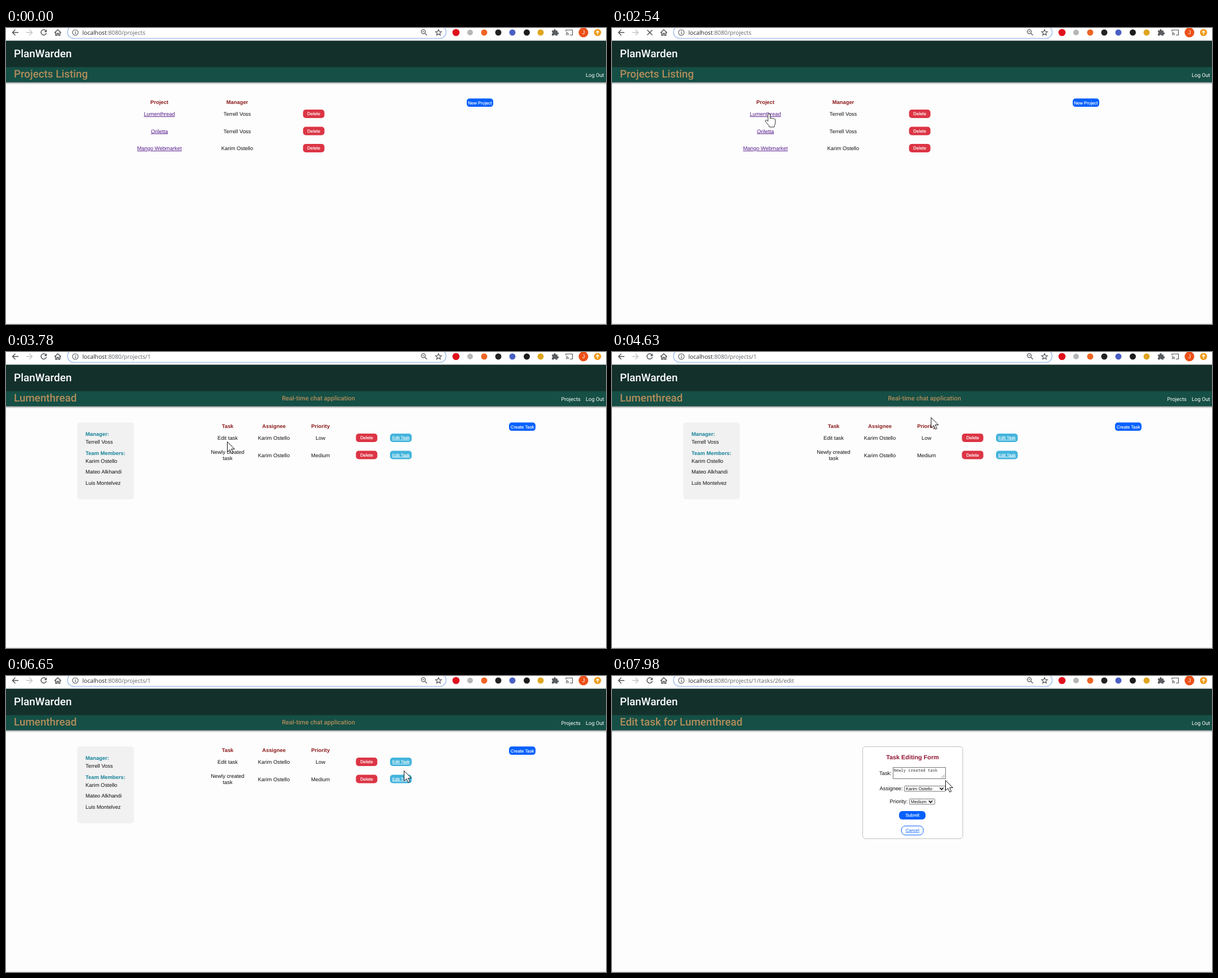
An HTML page that plays this animation: 1064x526 px, repeating every 8000 ms.

```html
<!DOCTYPE html>
<html lang="en">
<head>
<meta charset="utf-8">
<title>Projects Listing</title>
<style>
html, body { margin: 0; width: 100%; height: 100%; overflow: hidden; background: #fdfdfd; }
svg { display: block; width: 100%; height: 100%; }
text { font: 9.4px "Liberation Sans", Arial, sans-serif; fill: #111; text-rendering: geometricPrecision; }
.mid text, text.mid { text-anchor: middle; }
.b { font-weight: 700; }
text.th { font-weight: 700; fill: #8b1a1a; }
text.side { font-weight: 700; fill: #17829a; }
text.link { fill: #551a8b; text-decoration: underline; }
text.btn { font-size: 7.85px; fill: #fff; stroke: #fff; stroke-width: .15; text-anchor: middle; }
text.edit { font-size: 7.6px; text-decoration: underline; }
text.head { font: 500 19px Roboto, "Open Sans", sans-serif; fill: #fff; }
text.title { font: 500 18.8px Roboto, "Open Sans", sans-serif; fill: #b28d5b; }
text.sub { font: 500 11.1px Roboto, "Open Sans", sans-serif; fill: #b28d5b; }
text.nav { font: 9.4px Roboto, "Open Sans", sans-serif; fill: #fff; }
text.url { font: 10.3px "Open Sans", "Noto Sans", sans-serif; fill: #5f6368; }
text.field { font-size: 7.8px; }
.icon { fill: none; stroke: #505357; stroke-width: 1.5; }
.blue { fill: #0560fd; }
.red { fill: #dc3545; }
.cyan { fill: #43b4dc; }

/* one clock for every part; small lead keeps steps on time */
.a { animation: 8s step-end -5ms infinite; }
.list { animation-name: list; }
.proj { animation-name: proj; }
.form { animation-name: form; }
.idle { animation-name: idle; }
.busy { animation-name: busy; }
.id { animation-name: id; }
.task { animation-name: task; }
.cursor { animation-name: move; }
.arrow { animation-name: arrow; }
.hand { animation-name: hand; }

@keyframes list { 0% { opacity: 1 } 38.625%, 100% { opacity: 0 } }
@keyframes proj { 0% { opacity: 0 } 38.625% { opacity: 1 } 93.875%, 100% { opacity: 0 } }
@keyframes form { 0% { opacity: 0 } 93.875%, 100% { opacity: 1 } }
@keyframes idle { 0%, 41.625%, 95%, 100% { opacity: 1 } 31.75%, 88% { opacity: 0 } }
@keyframes busy { 0%, 41.625%, 95%, 100% { opacity: 0 } 31.75%, 88% { opacity: 1 } }
@keyframes id { 0% { fill-opacity: 0 } 36.75%, 100% { fill-opacity: 1 } }
@keyframes task { 0% { fill-opacity: 0 } 91%, 100% { fill-opacity: 1 } }

@keyframes arrow {
  0%, 18.75%, 41.625%, 82.5%, 96.875%, 100% { opacity: 1 }
  14%, 20.875%, 61.7%, 84.3% { opacity: 0 }
}
@keyframes hand {
  0%, 18.75%, 41.625%, 82.5%, 96.875%, 100% { opacity: 0 }
  14%, 20.875%, 61.7%, 84.3% { opacity: 1 }
}
@keyframes move {
  0% { transform: translate(1100px, 600px) }
  4.375% { transform: translate(976px, 506px); animation-timing-function: steps(3) }
  7.25% { transform: translate(690px, 352px); animation-timing-function: steps(3) }
  10.125% { transform: translate(355px, 192px); animation-timing-function: steps(4) }
  14% { transform: translate(255px, 147px) }
  15% { transform: translate(256px, 147px) }
  16.875% { transform: translate(259px, 148px) }
  17.875% { transform: translate(261px, 147px) }
  18.75% { transform: translate(262px, 135px) }
  20.875% { transform: translate(259px, 149px) }
  21.75% { transform: translate(256px, 149px) }
  23.875% { transform: translate(258px, 149px); animation-timing-function: steps(8) }
  31.75% { transform: translate(279px, 152px) }
  43.5% { transform: translate(290px, 156px); animation-timing-function: steps(4) }
  47.25% { transform: translate(392px, 159px); animation-timing-function: steps(6) }
  53.125% { transform: translate(477px, 141px) }
  54.125% { transform: translate(492px, 134px); animation-timing-function: steps(4) }
  58% { transform: translate(590px, 110px); animation-timing-function: steps(6) }
  63.625% { transform: translate(706px, 149px) }
  64.625% { transform: translate(705px, 150px) }
  65.5% { transform: translate(704px, 150px) }
  70.5% { transform: translate(704.5px, 152px) }
  80.25% { transform: translate(706px, 156px); animation-timing-function: steps(5) }
  85.5% { transform: translate(704.5px, 186px) }
  96.875% { transform: translate(688px, 196px) }
  97.875% { transform: translate(652px, 200px) }
  98.75% { transform: translate(612px, 194px) }
  99.75%, 100% { transform: translate(591px, 185px) }
}
</style>
</head>
<body>
<svg viewBox="0 0 1064 526">
  <defs>
    <linearGradient id="shade" x2="0" y2="1">
      <stop stop-color="#9a9a9a"/><stop offset="1" stop-color="#fdfdfd"/>
    </linearGradient>
    <g id="delete">
      <rect class="red" width="38" height="14.800" rx="5"/>
      <text class="btn" x="19" y="10.400">Delete</text>
    </g>
    <g id="edit">
      <rect class="cyan" width="38.500" height="14.800" rx="5"/>
      <text class="btn edit" x="19.400" y="10">Edit Task</text>
    </g>
    <path id="chevron" d="M-3.200-1.800 0 1.600 3.200-1.800" fill="none" stroke="#111" stroke-width="1.700"/>
  </defs>

  <rect width="1064" height="526" fill="#fdfdfd"/>
  <path d="M0 525.500H1064" stroke="#e4e4e4"/>

  <!-- browser bar -->
  <rect width="1064" height="23" fill="#fff"/>
  <rect x="109" y="-4" width="671.500" height="22.500" rx="11.200" fill="#fff" stroke="#a9c6ee" stroke-width="1.600"/>
  <path class="icon" d="M22 8H12M16.500 3 11.500 8l5 5"/>
  <path class="icon" d="M36 8H46M41.500 3l5 5-5 5" style="stroke:#c3c5c8"/>
  <g class="a idle">
    <path class="icon" d="M70.500 4.500A4.800 4.800 0 1 0 71.600 9"/>
    <path d="M72.300 2.500V7.300H67.500z" fill="#505357"/>
  </g>
  <path class="icon a busy" d="M62.500 3.500l9 9m0-9-9 9"/>
  <path class="icon" d="M86 8.500 91.800 3l5.800 5.500M88 7.500V13h2.500V9.500h2.600V13h2.500V7.500"/>
  <circle class="icon" cx="123" cy="8" r="5" style="stroke-width:1.1"/>
  <path class="icon" d="M123 7.300V11M123 5V6.300" style="stroke-width:1.2"/>
  <text class="url" x="135.500" y="12"><tspan fill="#202124">localhost</tspan>:8080/projects<tspan class="a id">/1</tspan><tspan class="a task">/tasks/26/edit</tspan></text>
  <g class="icon" style="stroke-width:1.2">
    <circle cx="740" cy="6.500" r="3.600"/><path d="M742.700 9.300 746.500 13M738.300 6.500h3.400"/>
    <path d="M767 2.800l1.500 3.500 3.800.3-2.900 2.500.9 3.700-3.300-2-3.300 2 .9-3.700-2.900-2.500 3.800-.3z"/>
    <path d="M993 6V3.500h11.500v9H1000M993 12.300h1M993 10a2.500 2.500 0 0 1 2.500 2.500M993 7.800a4.700 4.700 0 0 1 4.700 4.700"/>
  </g>
  <circle cx="798" cy="8" r="6.300" fill="#e0101c"/>
  <circle cx="823" cy="8" r="5" fill="#b4b6b8"/>
  <circle cx="848" cy="8" r="5.500" fill="#ee6423"/>
  <circle cx="873" cy="8" r="5.500" fill="#222"/>
  <circle cx="898" cy="8" r="5.500" fill="#4a5fc4"/>
  <circle cx="923.500" cy="8" r="5.500" fill="#1c1c1c"/>
  <circle cx="948" cy="8" r="5.500" fill="#dfa51f"/>
  <path d="M968 4.500h3.300a1.800 1.800 0 1 1 3.400 0H978v3.300a1.800 1.800 0 1 1 0 3.400v2.300h-3.300a1.800 1.800 0 0 0-3.400 0H968v-3.300a1.800 1.800 0 0 0 0-3.400z" fill="#5a5d61"/>
  <circle cx="1024" cy="8" r="8.600" fill="#ec5019"/>
  <text class="mid" x="1024" y="11.300" style="fill:#fff">J</text>
  <circle cx="1049" cy="8" r="6.300" fill="#f09a16"/>
  <path d="M1049 11.500V5.500M1046.300 7.800 1049 5l2.700 2.800" fill="none" stroke="#fff" stroke-width="1.500"/>

  <!-- site header -->
  <rect y="96" width="1064" height="4.500" fill="url(#shade)"/>
  <rect y="22.500" width="1064" height="47.500" fill="#14302b"/>
  <rect y="69.500" width="1064" height="27" fill="#154f45"/>
  <text class="head" x="14" y="52">PlanWarden</text>
  <text class="nav" x="1028" y="86.500">Log Out</text>

  <g class="a list">
    <text class="title" x="14" y="88">Projects Listing</text>
    <g class="mid">
      <text class="th" x="272" y="135">Project</text>
      <text class="th" x="410" y="135">Manager</text>
      <text class="link" x="272" y="156">Lumenthread</text>
      <text class="link" x="272" y="186.500">Oriletta</text>
      <text class="link" x="272" y="217">Mango Webmarket</text>
      <text x="410" y="156">Terrell Voss</text>
      <text x="410" y="186.500">Terrell Voss</text>
      <text x="410" y="217">Karim Ostello</text>
    </g>
    <use href="#delete" x="526.700" y="145.100"/>
    <use href="#delete" x="526.700" y="175.600"/>
    <use href="#delete" x="526.700" y="206.100"/>
    <rect class="blue" x="817" y="125.300" width="47" height="14.800" rx="5"/>
    <text class="btn" x="840.300" y="136">New Project</text>
  </g>

  <g class="a proj">
    <text class="title" x="14" y="88">Lumenthread</text>
    <text class="sub mid" x="554" y="86">Real-time chat application</text>
    <text class="nav" x="984.500" y="86.500">Projects</text>
    <rect x="126.500" y="125.300" width="100.300" height="136.500" rx="5" fill="#f1f1f1"/>
    <text class="side" x="141" y="149">Manager:</text>
    <text x="141" y="163">Terrell Voss</text>
    <text class="side" x="141" y="182.700">Team Members:</text>
    <text x="141" y="197">Karim Ostello</text>
    <text x="141" y="216.300">Mateo Alkhandi</text>
    <text x="141" y="235.800">Luis Montelvez</text>
    <g class="mid">
      <text class="th" x="393" y="135">Task</text>
      <text class="th" x="475" y="135">Assignee</text>
      <text class="th" x="557.700" y="135">Priority</text>
      <text x="393" y="156">Edit task</text>
      <text x="475" y="156">Karim Ostello</text>
      <text x="557.700" y="156">Low</text>
      <text x="393" y="181">Newly created</text>
      <text x="393" y="192">task</text>
      <text x="475" y="186.500">Karim Ostello</text>
      <text x="557.700" y="186.500">Medium</text>
    </g>
    <use href="#delete" x="620.500" y="145.100"/>
    <use href="#delete" x="620.500" y="175.600"/>
    <use href="#edit" x="681" y="145.100"/>
    <use href="#edit" x="681" y="175.600"/>
    <rect class="blue" x="892" y="125.300" width="47" height="14.800" rx="5"/>
    <text class="btn" x="915.700" y="136">Create Task</text>
  </g>

  <g class="a form">
    <text class="title" x="14" y="88">Edit task for Lumenthread</text>
    <rect x="444.500" y="125.500" width="177.500" height="163.500" rx="5" fill="#fff" stroke="#bdbdbd"/>
    <text class="b mid" x="533" y="148" style="font-size:10.8px;fill:#8f1430">Task Editing Form</text>
    <g fill="#fff" stroke="#767676">
      <rect x="498.500" y="162.500" width="93" height="20"/>
      <rect x="518.500" y="195.500" width="72.500" height="9.500" rx="1"/>
      <rect x="527.500" y="218.500" width="45" height="9.500" rx="1"/>
      <path d="M584 181l6-6M587 181l3-3" stroke-width=".8"/>
    </g>
    <text x="474" y="175.500">Task:</text>
    <text x="499.500" y="170" style="font:7.2px 'Noto Sans Mono','DejaVu Sans Mono',monospace;fill:#333">Newly created task</text>
    <text x="474.500" y="203">Assignee:</text>
    <text class="field" x="521" y="203">Karim Ostello</text>
    <use href="#chevron" x="584.500" y="200.300"/>
    <text x="492.500" y="226">Priority:</text>
    <text class="field" x="530" y="226">Medium</text>
    <use href="#chevron" x="565" y="223.300"/>
    <rect class="blue" x="509" y="240" width="47" height="15" rx="6"/>
    <text class="btn" x="532.700" y="250.200">Submit</text>
    <rect x="513.500" y="266.500" width="38.500" height="16" rx="6.500" fill="#fff" stroke="#0560fd"/>
    <text class="field mid" x="532.800" y="277" style="fill:#0560fd;text-decoration:underline">Cancel</text>
  </g>

  <g class="a cursor" fill="#fff" stroke="#111" stroke-linejoin="round">
    <path class="a arrow" d="M.5.500V18.500l4.300-3.900 3 6.700 2.900-1.300-3-6.500h5.600z"/>
    <path class="a hand" stroke="#222" transform="translate(-.5 0) scale(.96)" d="M-2 14.500V2.500a2 2 0 0 1 4 0V9.500c0-1.600 3.400-1.600 3.400.2 .4-1.500 3.200-1.200 3.200.6 .5-1.200 2.900-.8 2.900 1.200V17c0 2.600-1.600 4-2 8H.5C0 22-4 18-6.800 14.600-8 13-5.800 11.400-4.200 12.600z"/>
  </g>
</svg>
</body>
</html>
```
